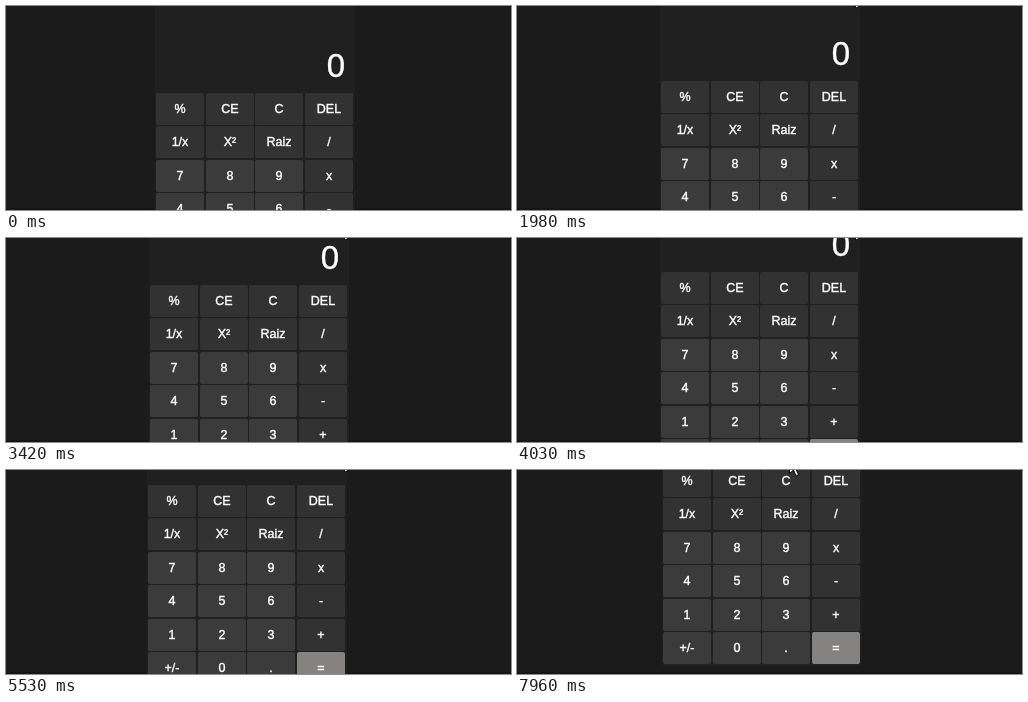
An HTML page with a canvas that plays this animation: 505 px wide and 204 px high, repeating every 8000 ms.

```html
<!DOCTYPE html>
<html lang="pt">
<head>
<meta charset="utf-8">
<title>Calculadora</title>
<style>
html, body { margin: 0; width: 100%; height: 100%; overflow: hidden; background: #1b1b1b; }
canvas { display: block; }
</style>
</head>
<body>
<canvas id="stage" width="505" height="204"></canvas>
<script>
const ctx = document.getElementById('stage').getContext('2d');
const LOOP = 8000;
const FONT = '"Liberation Sans", Arial, sans-serif';

const ROWS = [
  ['%', 'CE', 'C', 'DEL'],
  ['1/x', 'X²', 'Raiz', '/'],
  ['7', '8', '9', 'x'],
  ['4', '5', '6', '-'],
  ['1', '2', '3', '+'],
  ['+/-', '0', '.', '=']
];

// Resting points of each drag: time, left edge of the keys, vertical offset
const DRAG = [
  { t: 1250, x: 150, y: 0 },
  { t: 1980, x: 144, y: -12 },
  { t: 2880, x: 144, y: -35 },
  { t: 3420, x: 144, y: -40 },
  { t: 4230, x: 143, y: -56 },
  { t: 4900, x: 143, y: -60 },
  { t: 5530, x: 141, y: -72 },
  { t: 6140, x: 147, y: -92 },
  { t: 7950, x: 146, y: -92 }
];

// Tip of the mouse pointer
const POINTER = [
  { t: 190, x: 454, y: 190 },
  { t: 960, x: 331, y: -9 },
  { t: 1600, x: 332, y: -17 },
  { t: 6350, x: 332, y: -17 },
  { t: 6850, x: 246, y: 41 },
  { t: 7300, x: 272, y: -13 }
];

const ARROW = [[0, 0], [0, 16], [4, 12.5], [6.6, 18.5], [9, 17.5], [6.5, 11.7], [11.5, 11.7]];

const smooth = u => u * u * (3 - 2 * u);

// Eased position between the points, on whole pixels
function at(points, t) {
  const i = points.findIndex(p => p.t > t);
  if (i < 0) return points[points.length - 1];
  if (i === 0) return points[0];
  const a = points[i - 1], b = points[i];
  const u = smooth((t - a.t) / (b.t - a.t));
  return {
    x: Math.ceil(a.x + (b.x - a.x) * u),
    y: Math.ceil(a.y + (b.y - a.y) * u)
  };
}

function box(x, y, w, h, r, color) {
  ctx.fillStyle = color;
  ctx.beginPath();
  ctx.roundRect(x, y, w, h, r);
  ctx.fill();
}

// The thin outline gives the letters their slightly heavy look
function label(text, x, y, size) {
  ctx.font = size + 'px ' + FONT;
  ctx.textAlign = 'center';
  ctx.fillStyle = ctx.strokeStyle = '#fff';
  ctx.lineWidth = 0.4;
  ctx.fillText(text, x, y);
  ctx.strokeText(text, x, y);
}

function keyColor(row, col) {
  if (row === 5 && col === 3) return '#858381';
  return row > 1 && col < 3 ? '#3b3b3b' : '#323232';
}

function drawCalculator({ x, y }) {
  box(x - 1, y - 40, 200, 328, 3, '#202020');
  label('0', x + 180, y + 71, 33);
  ROWS.forEach((row, r) => row.forEach((text, c) => {
    const left = x + Math.round(c * 49.5);
    const top = y + 87 + Math.round(r * 33.4);
    box(left, top, 48, 32, 2, keyColor(r, c));
    label(text, left + 24, top + 20, 12.5);
  }));
}

function drawPointer({ x, y }) {
  ctx.beginPath();
  ARROW.forEach(([dx, dy]) => ctx.lineTo(x + dx + 0.5, y + dy + 0.5));
  ctx.closePath();
  ctx.fillStyle = '#fff';
  ctx.fill();
  ctx.strokeStyle = '#000';
  ctx.lineWidth = 1;
  ctx.stroke();
}

function draw(t) {
  ctx.fillStyle = '#1b1b1b';
  ctx.fillRect(0, 0, 505, 204);
  ctx.fillStyle = '#191516';
  ctx.fillRect(0, 202, 505, 2);
  drawCalculator(at(DRAG, t));
  if (t >= POINTER[0].t) drawPointer(at(POINTER, t));
}

const start = performance.now();
function tick() {
  draw((performance.now() - start) % LOOP);
  requestAnimationFrame(tick);
}
tick();
</script>
</body>
</html>
```
